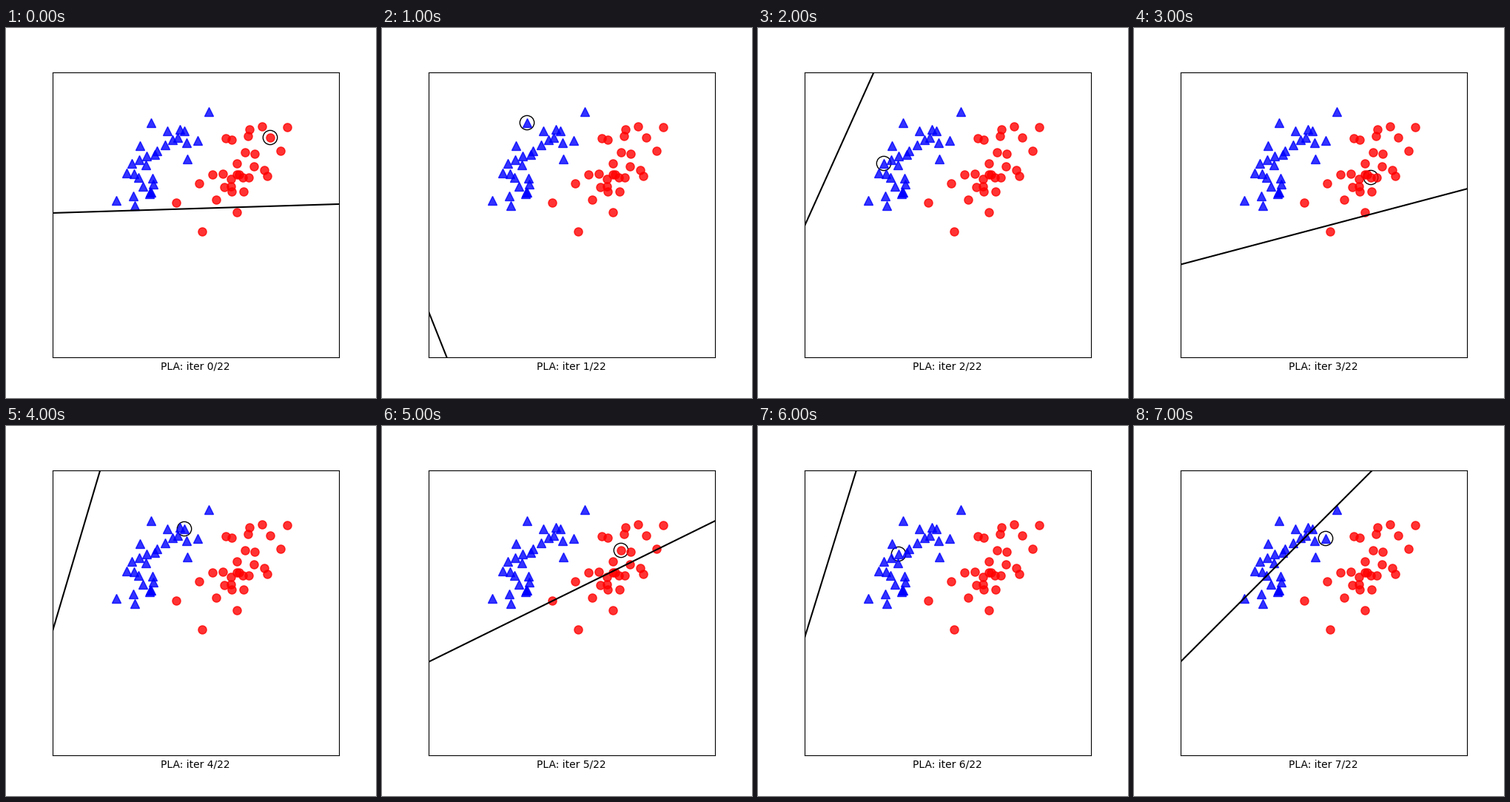
These frames come from a looping animation (500 by 500 pixels, 8 s). A matplotlib script:

```python
import numpy as np
import matplotlib.pyplot as plt
from matplotlib.animation import FuncAnimation

TOTAL = 22
STEPS = 8

# Point positions in stage pixels, measured from the top left
BLUE = [
    (274, 113), (196, 128), (218, 139), (235, 137), (241, 139), (232, 148),
    (225, 151), (244, 155), (259, 152), (215, 158), (181, 159), (204, 166),
    (201, 171), (190, 173), (180, 178), (245, 177), (170, 183), (189, 185),
    (163, 196), (173, 197), (179, 202), (198, 203), (199, 211), (185, 214),
    (172, 227), (195, 222), (194, 224), (196, 222), (149, 233), (174, 240),
]
RED = [
    (380, 134), (346, 133), (329, 137), (327, 146), (357, 148), (297, 149),
    (305, 151), (371, 166), (323, 168), (336, 170), (312, 183), (335, 187),
    (349, 192), (353, 200), (279, 198), (293, 197), (312, 198), (315, 198),
    (320, 202), (328, 202), (304, 204), (295, 215), (304, 214), (305, 221),
    (321, 221), (261, 210), (284, 232), (230, 236), (312, 249), (265, 275),
]


def to_data(points):
    """Stage pixels to the axis range x 0..6, y -2..4."""
    px, py = np.array(points, float).T
    return np.column_stack([(px - 62.5) * 6 / 387.5, 4 - (py - 60) * 6 / 385])


blue, red = to_data(BLUE), to_data(RED)

# Misclassified point picked at each step, with its label
picks = [(red[4], -1), (blue[1], 1), (blue[16], 1), (red[18], -1),
         (blue[4], 1), (red[8], -1), (blue[13], 1), (blue[8], 1)]

# Perceptron learning: w <- w + y * (1, x1, x2)
weights = [np.array([-0.848, -0.0255, 0.816])]
for point, label in picks[:-1]:
    weights.append(weights[-1] + label * np.array([1, *point]))

fig, ax = plt.subplots(figsize=(5, 5), dpi=100)
ax.plot(*blue.T, 'b^', markersize=8, alpha=0.8)
ax.plot(*red.T, 'ro', markersize=8, alpha=0.8)
boundary, = ax.plot([], [], 'k')
ring = ax.add_artist(plt.Circle((0, 0), 0.15, color='k', fill=False))
ax.axis([0, 6, -2, 4])
ax.set_xticks([])
ax.set_yticks([])


def update(i):
    w0, w1, w2 = weights[i]
    x = np.array([-100, 100])
    boundary.set_data(x, -(w0 + w1 * x) / w2)
    ring.center = picks[i][0]
    ax.set_xlabel(f'PLA: iter {i}/{TOTAL}')
    return boundary, ring


anim = FuncAnimation(fig, update, frames=STEPS, interval=1000, repeat=True,
                     repeat_delay=0, init_func=lambda: update(0))
plt.show()
```
